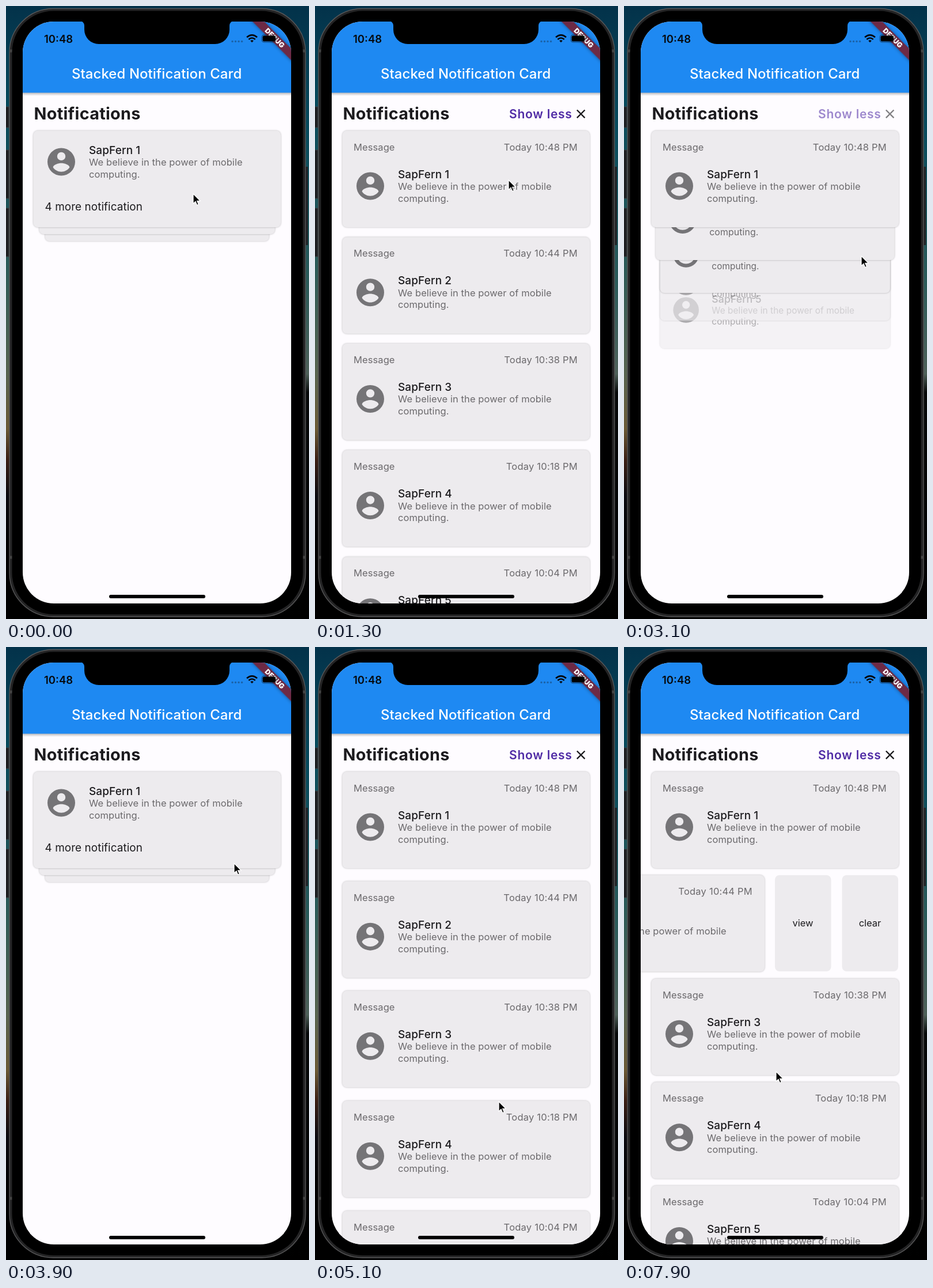
An HTML page that plays this animation: 526x1064 px, repeating every 8 s.

```html
<!DOCTYPE html>
<html lang="en">
<head>
<meta charset="utf-8">
<title>Stacked cards</title>
<style>
  html, body { margin: 0; width: 100%; height: 100%; overflow: hidden; background: #000; }
  svg { display: block; width: 100%; height: 100%; }
  text { font-family: Inter, Roboto, sans-serif; fill: #1c1b1e; }
  .body { font-size: 16.5px; fill: #6b696c; letter-spacing: .09px; }
  .time { letter-spacing: .22px; text-anchor: end; }
  .name { font-size: 19px; font-weight: 500; letter-spacing: .1px; }
  .more { font-size: 18.9px; letter-spacing: .07px; }
  .btn { font-size: 16.5px; text-anchor: middle; }
  .face { fill: #edebee; filter: drop-shadow(0 .5px 1.6px rgba(0,0,0,.28)); }
  .icon { fill: #757477; }
  .ribbon { fill: #6d2a45; filter: drop-shadow(0 0 3px rgba(0,0,0,.4)); }
</style>
</head>
<body>
<svg viewBox="0 0 526 1064" preserveAspectRatio="none">
  <defs>
    <linearGradient id="skyL" x2="0" y2="1">
      <stop offset="0" stop-color="#03324a"/><stop offset=".16" stop-color="#064a5c"/>
      <stop offset=".42" stop-color="#2a5a58"/><stop offset=".6" stop-color="#586450"/>
      <stop offset=".69" stop-color="#6b5a35"/><stop offset=".74" stop-color="#3a1f14"/>
      <stop offset=".8" stop-color="#0a0a10"/><stop offset=".88" stop-color="#000"/>
    </linearGradient>
    <linearGradient id="skyR" x2="0" y2="1">
      <stop offset="0" stop-color="#03324a"/><stop offset=".2" stop-color="#064a5c"/>
      <stop offset=".45" stop-color="#2a5a58"/><stop offset=".6" stop-color="#4d6058"/>
      <stop offset=".63" stop-color="#060808"/><stop offset="1" stop-color="#000"/>
    </linearGradient>
    <linearGradient id="barShade" x2="0" y2="1">
      <stop offset="0" stop-opacity=".28"/><stop offset="1" stop-opacity="0"/>
    </linearGradient>
    <clipPath id="screen"><rect x="29" y="27" width="466" height="1010" rx="54"/></clipPath>
    <clipPath id="reveal"><rect id="gap" x="495" y="390" width="466" height="180"/></clipPath>
  </defs>

  <rect width="263" height="1064" fill="url(#skyL)"/>
  <rect x="263" width="263" height="1064" fill="url(#skyR)"/>
  <g fill="#1d1f22" stroke="#3a3d40">
    <rect x="-3" y="175" width="8" height="36"/>
    <rect x="-3" y="250" width="8" height="84"/>
    <rect x="-3" y="351" width="8" height="84"/>
    <rect x="520" y="279" width="4" height="136" stroke="none"/>
  </g>
  <rect x="6" y="4.5" width="514" height="1055.5" rx="76" fill="#242425" stroke="#5a5a5b" stroke-width="1.3"/>
  <path d="M6 78h6M514 78h6M6 957h6M514 957h6" stroke="#444" stroke-width="5"/>
  <rect x="10.5" y="8.5" width="505" height="1047.5" rx="72"/>

  <g clip-path="url(#screen)">
    <rect x="29" y="27" width="466" height="1010" fill="#fefcff"/>
    <g id="list"></g>
    <rect x="29" y="150" width="466" height="6" fill="url(#barShade)"/>
    <rect x="29" y="27" width="466" height="123.5" fill="#1e89f2"/>
    <text x="261.6" y="125.5" text-anchor="middle" font-size="23.9" font-weight="500" letter-spacing=".12" style="fill:#fff">Stacked Notification Card</text>
    <text x="48.5" y="197.3" font-size="28.8" font-weight="700" letter-spacing=".28">Notifications</text>
    <g id="less">
      <text x="337" y="194.5" font-size="21" font-weight="600" letter-spacing=".75" style="fill:#4f2ba5">Show less</text>
      <path d="M454.8 180.5l13.6 13.6m0-13.6l-13.6 13.6" stroke="#1c1b1e" stroke-width="2.4"/>
    </g>
    <g transform="translate(495 27) rotate(45)">
      <rect class="ribbon" x="-60" y="33" width="120" height="14.4"/>
      <text y="44.5" text-anchor="middle" font-size="12.2" font-weight="900" style="fill:#fff">DEBUG</text>
    </g>
    <text x="66" y="63.7" font-size="18.5" font-weight="600" style="fill:#06090d">10:48</text>
    <g fill="#1a62a8">
      <circle cx="393" cy="61.5" r="1.7"/><circle cx="398.5" cy="61.5" r="1.7"/>
      <circle cx="404" cy="61.5" r="1.7"/><circle cx="409.5" cy="61.5" r="1.7"/>
    </g>
    <g fill="none" stroke="#05080c" stroke-width="2.6">
      <path d="M418 54.3q9-8 18 0M421.3 58q5.7-5 11.4 0"/>
      <path d="M427 63.3l-2.8-3q2.8-2 5.6 0z" fill="#05080c" stroke="none"/>
    </g>
    <rect x="444" y="50" width="25.5" height="13" rx="4" fill="none" stroke="#000" stroke-opacity=".5"/>
    <rect x="445.5" y="51.5" width="22.5" height="10" rx="2.8"/>
    <path d="M471 54.5q2.5 2 0 4z" fill-opacity=".6"/>
    <path d="M128 26a8 8 0 0 1 8 8v7a25 25 0 0 0 25 25h202a25 25 0 0 0 25-25v-7a8 8 0 0 1 8-8z"/>
    <rect x="179" y="1022" width="167" height="6" rx="3"/>
  </g>

  <circle id="press" r="26.5" fill="none" stroke="#000" stroke-width="1.7"/>
  <path id="arrow" d="M0 0V17L4 13.3 6.6 19.5 9.3 18.4 6.7 12.4H12.2Z" stroke="#fff" stroke-width="1.2"/>
</svg>
<script>
const LOOP = 8000, RUN = 555, STEP = 179.6, HEIGHT = 167.5, MID = 262.2, BASE = 384;
const times = ['10:48', '10:44', '10:38', '10:18', '10:04'];
const cursor = [
  [0, 325, 326], [900, 327, 320], [1300, 336, 302], [1800, 350, 285], [2400, 400, 186],
  [2600, 402, 188], [3100, 412, 434], [3700, 400, 410], [4400, 386, 290], [4560, 384, 310],
  [4700, 374, 551], [4850, 345, 740], [5100, 319, 789], [5500, 335, 790], [5980, 427, 495],
  [6150, 427.5, 496], [6400, 323, 496], [6600, 257.5, 497], [7200, 300, 600],
  [7500, 312, 765], [7900, 264, 737], [8000, 262, 735]
];
const swipe = [[0, 0], [6150, 0], [6400, 104.5], [6600, 170], [6720, 214], [6900, 233], [8000, 233]];
const presses = [[980, 1070], [2480, 2570], [4520, 4680], [6010, 6620]];

const $ = id => document.getElementById(id);
const clamp = v => Math.max(0, Math.min(1, v));
const mix = (a, b, k) => a + (b - a) * k;
const text = (cls, x, y, s) => `<text class="${cls}" x="${x}" y="${y}">${s}</text>`;

function track(keys, t) {
  const i = Math.max(1, keys.findIndex(k => k[0] >= t));
  const a = keys[i - 1], b = keys[i];
  return a.slice(1).map((v, j) => mix(v, b[j + 1], (t - a[0]) / (b[0] - a[0])));
}

function avatar(y) {
  return `<g transform="translate(96 ${y}) scale(2.4) translate(-12 -12)"><path class="icon" d="M12 2a10 10 0 1 0 0 20a10 10 0 1 0 0-20zm0 3a3 3 0 1 1 0 6a3 3 0 1 1 0-6zm0 14.2c-2.5 0-4.71-1.28-6-3.22.03-1.99 4-3.08 6-3.08 1.99 0 5.97 1.09 6 3.08-1.29 1.94-3.5 3.22-6 3.22z"/></g>`;
}

const message = (i, y) => avatar(y + 14) +
  text('name', 144, y, 'SapFern ' + (i + 1)) +
  text('body', 144, y + 20.5, 'We believe in the power of mobile') +
  text('body', 144, y + 41, 'computing.');

function cardMarkup(i) {
  const open = text('body', 67, 34, 'Message') +
    text('body time', 456, 34, `Today ${times[i]} PM`) + message(i, 82);
  const stacked = i ? '' : `<g id="stacked">${message(0, 40)}${text('more', 67.5, 138, '4 more notification')}</g>`;
  return `<g id="card${i}"><rect class="face" x="47.5" width="429.5" height="${HEIGHT}" rx="8"/>` +
    `<g id="open${i}">${open}</g>${stacked}</g>`;
}

function button(x, label) {
  return `<rect x="${x}" y="396" width="97.5" height="167" rx="8" fill="#edebee"/>` +
    text('btn', x + 48.5, 485, label);
}

$('list').innerHTML = `<g clip-path="url(#reveal)">${button(262, 'view')}${button(378.5, 'clear')}</g>` +
  times.map((_, i) => cardMarkup(i)).reverse().join('');

// Overshooting ease; closing plays the same curve backwards.
function backOut(u) {
  const v = u - 1;
  return 1 + 2.70158 * v ** 3 + 1.70158 * v * v;
}

function draw(t) {
  const phase = start => clamp((t - start) / RUN);
  const u = phase(1078) - phase(2580.5) + phase(4683);
  const p = u > 0 ? backOut(u) : 0;
  const fade = clamp(p * 2.05);
  const [slide] = track(swipe, t);

  times.forEach((_, i) => {
    const depth = Math.min(i, 2);
    const bottom = BASE + mix(depth * 12, i * STEP, p);
    const scale = mix(1 - depth * .048, 1, clamp(p));
    const x = MID - (i === 1 ? slide : 0);
    const el = $('card' + i);
    el.setAttribute('transform', `translate(${x} ${bottom}) scale(${scale}) translate(${-MID} ${-HEIGHT})`);
    if (i > 2) el.setAttribute('opacity', fade);
  });
  $('open0').style.display = u > 0 ? '' : 'none';
  $('stacked').style.display = u > 0 ? 'none' : '';
  $('less').setAttribute('opacity', fade);
  $('gap').setAttribute('x', 495 - slide);

  const [x, y] = track(cursor, t);
  const at = `translate(${x} ${y})`;
  $('arrow').setAttribute('transform', at);
  $('press').setAttribute('transform', at);
  $('press').style.display = presses.some(([a, b]) => t >= a && t < b) ? '' : 'none';
}

const begin = performance.now();
function tick() {
  draw((performance.now() - begin) % LOOP);
  requestAnimationFrame(tick);
}
tick();
</script>
</body>
</html>
```
